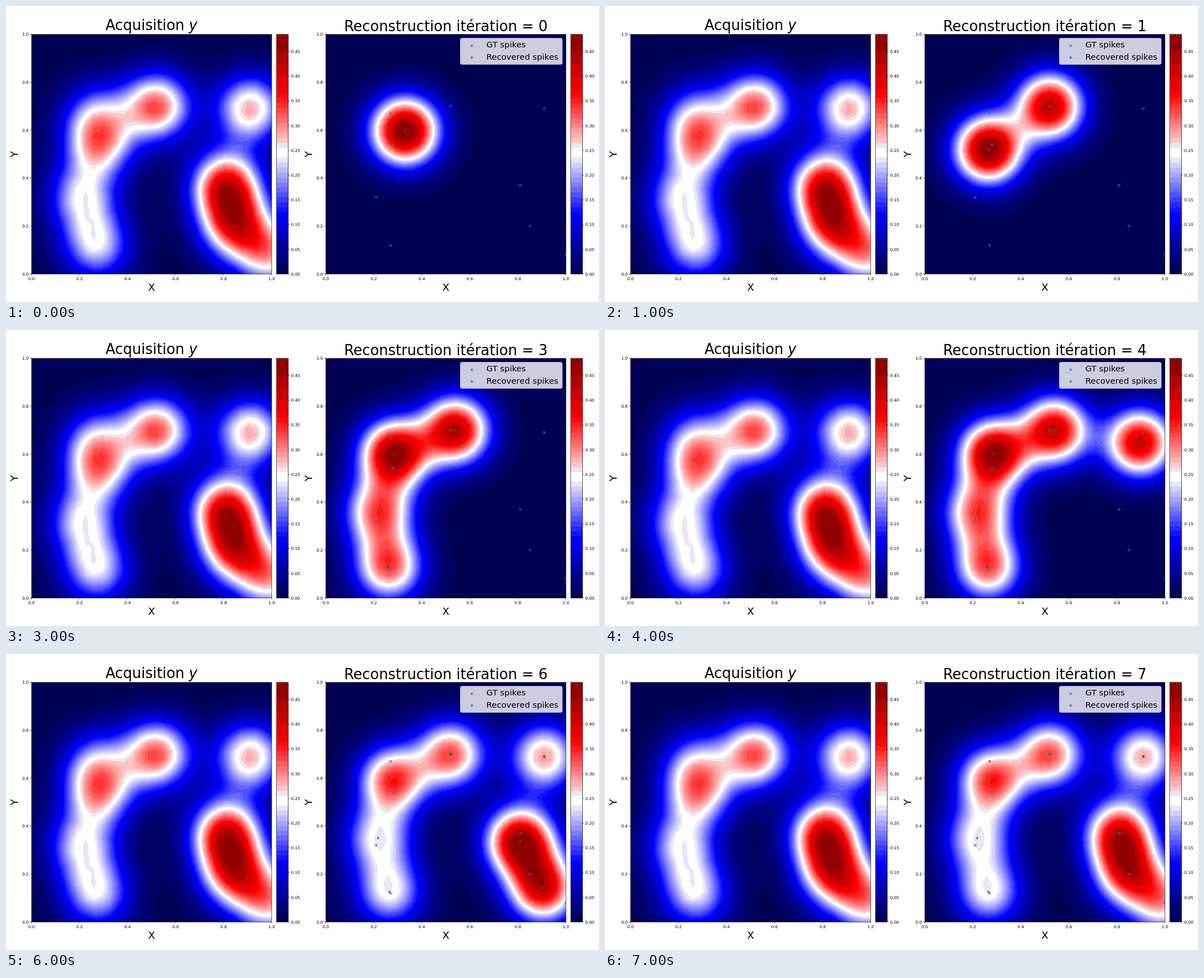
Write an HTML page with a canvas that moves like this. It is 1058 px wide and 529 px high and loops after 8000 ms.

```html
<!DOCTYPE html>
<html lang="fr">
<head>
<meta charset="utf-8">
<title>Reconstruction</title>
<style>
  html, body { margin: 0; width: 100%; height: 100%; overflow: hidden; background: #fff; }
  #stage { position: relative; width: 1058px; height: 529px; overflow: hidden; }
  canvas { position: absolute; top: 50.5px; width: 428.5px; height: 428.5px; }
  #acquired { left: 45.5px; }
  #rebuilt { left: 570.5px; }
  svg { position: absolute; left: 0; top: 0; }
  text { font-family: "DejaVu Sans", Verdana, sans-serif; font-size: 7.3px; fill: #000; }
  .title { font-size: 25.7px; text-anchor: middle; }
  .label { font-size: 18.3px; text-anchor: middle; }
  .legend { font-size: 14.75px; }
  .mid { text-anchor: middle; }
  .end { text-anchor: end; }
  .line { stroke: #000; stroke-width: .65; fill: none; }
  .gt { stroke: #1f77b4; stroke-width: 1.05; fill: none; }
  .found { stroke: #008000; stroke-width: 1.05; fill: none; }
</style>
</head>
<body>
<div id="stage">
  <canvas id="acquired" width="857" height="857"></canvas>
  <canvas id="rebuilt" width="857" height="857"></canvas>
  <svg width="1058" height="529" viewBox="0 0 1058 529">
    <defs><clipPath id="plot"><rect x="570.5" y="50.5" width="428.5" height="428.5"/></clipPath></defs>
    <g id="bars"></g>
    <g clip-path="url(#plot)"><path id="truth" class="gt"/><path id="spikes" class="found"/></g>
    <g id="axes"></g>
    <rect x="810.5" y="57.5" width="182" height="47" rx="3" fill="#fff" fill-opacity=".8" stroke="#ccc" stroke-opacity=".8" stroke-width=".75"/>
    <path id="keyTruth" class="gt"/><path id="keySpike" class="found"/>
    <text class="legend" x="857" y="74.3">GT spikes</text>
    <text class="legend" x="857" y="95.6">Recovered spikes</text>
    <text class="title" x="259.5" y="43.3">Acquisition <tspan font-style="italic">y</tspan></text>
    <text class="title" id="title" x="784.7" y="45.2"></text>
  </svg>
</div>
<script>
const SIZE = 428.5, TOP = 50.5, LEFT = 45.5, RIGHT = 570.5;
const MAX = 0.485, SIGMA = 0.1, GRID = 32, PERIOD = 8000;
const $ = id => document.getElementById(id);
const range = n => Array.from({ length: n }, (_, i) => i);

// True spikes: [x, y, weight].
const truth = [
  [.27, .67, .15], [.28, .54, .25], [.52, .70, .325], [.21, .32, .215], [.27, .12, .225],
  [.91, .69, .285], [.81, .37, .38], [.85, .20, .33], [1, .08, .25]
];

// Recovered positions per iteration; their weights are fitted.
const arch = [[.285, .602], [.54, .70], [.22, .358], [.262, .13]];
const settled = [[.278, .593], [.52, .70], [.218, .35], [.265, .126]];
const side = [.895, .648];
const steps = [
  [[.33, .597]],
  [[.265, .52], [.52, .70]],
  [[.268, .56], [.52, .70], [.242, .213]],
  arch,
  [...arch, side],
  [...truth.slice(0, 5), side],
  [...settled, truth[5], [.81, .337], [.905, .14]],
  [...settled, ...truth.slice(5)]
];

const gauss = ([ax, ay], [bx, by], s) => Math.exp(-((ax - bx) ** 2 + (ay - by) ** 2) / (2 * s * s));

// Least-squares weights by Gauss-Seidel; blurred spikes overlap with width sigma * sqrt 2.
function fit(points) {
  const overlap = (a, b) => gauss(a, b, SIGMA * Math.SQRT2);
  const weights = points.map(() => 0);
  for (let pass = 0; pass < 100; pass++) {
    points.forEach((p, i) => {
      const goal = truth.reduce((sum, t) => sum + t[2] * overlap(p, t), 0);
      const others = points.reduce((sum, q, j) => j === i ? sum : sum + weights[j] * overlap(p, q), 0);
      weights[i] = goal - others;
    });
  }
  return points.map(([x, y], i) => [x, y, weights[i]]);
}

function sampleGrid(spikes, noise) {
  let seed = 11;
  const random = () => (seed = seed * 16807 % 2147483647) / 2147483647;
  const values = range(GRID * GRID).map(i => {
    const p = [i % GRID, Math.floor(i / GRID)].map(c => c / (GRID - 1));
    return spikes.reduce((sum, s) => sum + s[2] * gauss(p, s, SIGMA), 0);
  });
  const scale = Math.max(1, MAX / Math.max(...values));
  return values.map(v => v * scale + noise * (random() * 2 - 1));
}

// Contour bands are narrow in the middle and wider at both ends.
const edges = [0];
for (let v = .01; v < .46; v += v < .11 ? .015 : v < .37 ? .01 : .025) edges.push(v);
edges.push(MAX);

function seismic(t) {
  const ramp = [[0, 0, .3], [0, 0, 1], [1, 1, 1], [1, 0, 0], [.5, 0, 0]];
  const i = Math.min(3, Math.floor(t * 4)), f = t * 4 - i;
  return ramp[i].map((c, k) => Math.round(255 * (c + (ramp[i + 1][k] - c) * f)));
}
const bands = edges.slice(1).map((hi, i) => {
  const mid = (edges[i] + hi) / 2, off = Math.abs(mid - MAX / 2);
  const rgb = off < .009 ? [255, 255, 255] : off < .019 ? [236, 229, 245] : seismic(mid / MAX);
  return { lo: edges[i], hi, rgb };
});
const LUT = 970;
const lut = Uint32Array.from({ length: LUT + 1 }, (_, i) => {
  const v = (i + .5) * MAX / LUT;
  const [r, g, b] = (bands.find(s => v < s.hi) || bands[bands.length - 1]).rgb;
  return (255 << 24 | b << 16 | g << 8 | r) >>> 0;
});

function drawField(canvas, spikes, noise = 0) {
  const n = canvas.width, ctx = canvas.getContext("2d");
  const image = ctx.createImageData(n, n), out = new Uint32Array(image.data.buffer);
  const grid = sampleGrid(spikes, noise), k = (GRID - 1) / n;
  for (let py = 0; py < n; py++) {
    const gy = (n - py - .5) * k, j = Math.floor(gy), fy = gy - j;
    for (let px = 0; px < n; px++) {
      const gx = (px + .5) * k, i = Math.floor(gx), fx = gx - i, a = j * GRID + i, b = a + GRID;
      const low = grid[a] + (grid[a + 1] - grid[a]) * fx;
      const high = grid[b] + (grid[b + 1] - grid[b]) * fx;
      const v = (low + (high - low) * fy) / MAX * LUT;
      out[py * n + px] = lut[Math.max(0, Math.min(LUT, Math.floor(v)))];
    }
  }
  ctx.putImageData(image, 0, 0);
}

const cross = (x, y) => `M${x - 2.2} ${y - 2.2}l4.4 4.4m0-4.4l-4.4 4.4`;
const plus = (x, y) => `M${x - 2.7} ${y}h5.4m-2.7-2.7v5.4`;
const marks = (spikes, shape) =>
  spikes.map(([x, y]) => shape(RIGHT + x * SIZE, TOP + (1 - y) * SIZE)).join("");

const frame = (x, w) => `<rect class="line" x="${x}" y="${TOP}" width="${w}" height="${SIZE}"/>`;
const tick = d => `<path class="line" d="${d}"/>`;
const text = (cls, x, y, s) => `<text class="${cls}" x="${x}" y="${y}">${s}</text>`;

function axes(x0) {
  const bottom = TOP + SIZE, barX = x0 + 437, barW = 21;
  let s = frame(x0, SIZE) + frame(barX, barW);
  for (let i = 0; i <= 5; i++) {
    const name = (i / 5).toFixed(1), x = x0 + i / 5 * SIZE, y = bottom - i / 5 * SIZE;
    s += tick(`M${x} ${bottom}v2.5M${x0} ${y}h-2.5`);
    s += text("mid", x, 490.2, name) + text("end", x0 - 5, y + 2.7, name);
  }
  for (let i = 0; i < 10; i++) {
    const y = bottom - i * .05 / MAX * SIZE;
    s += tick(`M${barX + barW} ${y}h2.5`) + text("", barX + barW + 5, y + 2.7, (i * .05).toFixed(2));
  }
  s += text("label", x0 + SIZE / 2, 508.8, "X");
  s += `<text class="label" transform="translate(${x0 - 24.7} 264.8) rotate(-90)">Y</text>`;
  $("axes").innerHTML += s;
  $("bars").innerHTML += bands.map(({ lo, hi, rgb }) =>
    `<rect x="${barX}" y="${bottom - hi / MAX * SIZE}" width="${barW}" height="${(hi - lo) / MAX * SIZE}" fill="rgb(${rgb})" shape-rendering="crispEdges"/>`
  ).join("");
}

axes(LEFT);
axes(RIGHT);
drawField($("acquired"), truth, .003);
$("truth").setAttribute("d", marks(truth, cross));
$("keyTruth").setAttribute("d", cross(831, 71));
$("keySpike").setAttribute("d", plus(831, 92));

let shown = -1;
function show(now) {
  const step = Math.floor(now % PERIOD / 1000);
  if (step !== shown) {
    shown = step;
    drawField($("rebuilt"), fit(steps[step]));
    $("spikes").setAttribute("d", marks(steps[step], plus));
    $("title").textContent = `Reconstruction itération = ${step}`;
  }
  requestAnimationFrame(show);
}
show(performance.now());
</script>
</body>
</html>
```
